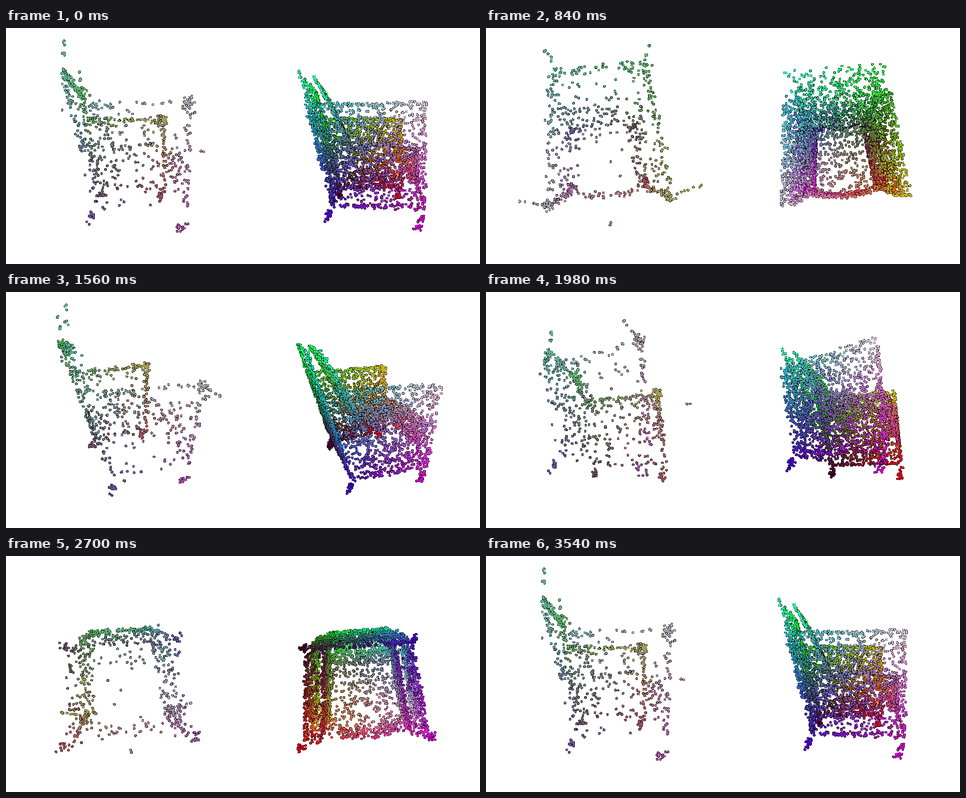
A matplotlib script for the animation above (3600 ms loop, 1024 px wide and 512 px high).

```python
import numpy as np
import matplotlib.pyplot as plt
from matplotlib.animation import FuncAnimation

W, H, DPI = 1024, 512, 100
FRAMES, INTERVAL = 60, 60
FOCAL = H / 2 / np.tan(np.pi / 6)  # 60 degree field of view, camera distance 1
SLAB = 0.055                       # depth step that earns a dark outline
DOT, HALO = 3.7, 4.9               # diameters in pixels

rng = np.random.default_rng(12)


def rear_x(y):
    """The rear of the chair leans back with height."""
    return -.178 - .25 * y


def arm_point(front, high, inset, side):
    """Place in an armrest; front and high run from 0 to 1."""
    y = -.24 + .4 * high
    x = rear_x(y) + front * (.235 - rear_x(y))
    z = side * (.2 + .04 * front + .024 * high - inset)
    return np.stack(np.broadcast_arrays(x, y, z), axis=-1)


def arm(side, n):
    """Random points on the six faces of the armrest."""
    cube = rng.random((n, 3))
    axis = rng.choice(3, n, p=[.12, .12, .76])
    cube[np.arange(n), axis] = rng.integers(0, 2, n)
    front, high, depth = cube.T
    return arm_point(front, high, .065 * depth, side)


def sheet(profile, n, width=.18):
    """Random points on a profile curve swept across the chair."""
    t, z = rng.random(n), rng.uniform(-1, 1, n)
    x, y = profile(t)
    # The seat and its front edge bulge forward in the middle.
    x = x + .03 * np.clip(x / .22, 0, 1) * (1 - z ** 2)
    return np.column_stack([x, y + 0 * t, z * (width + 0 * t)])


def rear(t):
    y = .307 - .547 * t
    return rear_x(y), y


def cushion(t):
    return -.05 - .155 * t ** 1.15, -.02 + .32 * t


def seat(t):
    return -.05 + .273 * t, -.018 + .026 * np.sin(np.pi * t)


def front_edge(t):
    return .223 + 0 * t, -.014 - .164 * t


def line(a, b, n, spread):
    a, b = np.array(a), np.array(b)
    return a + rng.random((n, 1)) * (b - a) + rng.normal(0, spread, (n, 3))


def leg(front, side, n, gather):
    """Leg whose points gather towards the foot."""
    top = arm_point(front, 0, .008, side)
    foot = top - (.02, .05 + .025 * front, 0)
    t = rng.random((n, 1)) ** gather
    return top + t * (foot - top) + rng.normal(0, .006, (n, 3))


def chair(arms, rear_n, cushion_n, seat_n, edge_n, leg_n, gather, noise):
    parts = [arm(side, arms // 2) for side in (-1, 1)]
    parts += [sheet(rear, rear_n), sheet(cushion, cushion_n, .175),
              sheet(seat, seat_n), sheet(front_edge, edge_n)]
    parts += [leg(front, side, leg_n, gather)
              for front in (0, 1) for side in (-1, 1)]
    points = np.vstack(parts)
    return points + rng.normal(0, noise, points.shape)


def stray_points():
    """Points crowding the chair's edges, and outliers beyond its corners."""
    parts = [line((-.25, .305, -.17), (-.25, .305, .17), 46, .009),
             line((.34, -.027, 0), (.39, -.027, 0), 2, .002)]
    for side in (-1, 1):
        back, tip, low = (arm_point(f, h, .02, side)
                          for f, h in [(0, 1), (1, 1), (1, 0)])
        crown = np.array([-.25, .33, side * .15])
        parts += [line(back, tip, 26, .006), line(tip, low, 26, .006),
                  line(tip, tip, 18, .013),
                  line(crown, back, 20, .012),
                  line(tip, (.205, .153, side * .38), 9, .002),
                  line(crown, crown + (0, .12, 0), 6, .003)]
    return np.vstack(parts)


def position_colors(p):
    return np.clip((p + (.3, .28, .3)) / (.66, .6, .68), 0, 1)


sparse = np.vstack([chair(240, 85, 20, 10, 32, 13, .35, .006), stray_points()])
dense = chair(2150, 480, 430, 320, 190, 24, .5, .002)
points = np.vstack([sparse, dense])
center_x = np.repeat([W / 4, 3 * W / 4], [len(sparse), len(dense)])
colors = np.vstack([.31 + .42 * position_colors(sparse), position_colors(dense)])

count = len(points)
all_colors = np.vstack([np.zeros((count, 3)), colors])
all_sizes = np.repeat([(HALO * 72 / DPI) ** 2, (DOT * 72 / DPI) ** 2], count)


def project(theta):
    """Screen positions and depths; azimuth and elevation both equal theta."""
    s, c = np.sin(theta), np.cos(theta)
    eye = np.array([s * c, s, c * c])
    right = np.sign(c) * np.array([c, 0, -s])
    up = np.cross(eye, right)
    depth = 1 - points @ eye
    x = center_x + FOCAL * (points @ right) / depth
    y = H / 2 - FOCAL * (points @ up) / depth
    return np.column_stack([x, y]), depth


fig = plt.figure(figsize=(W / DPI, H / DPI), dpi=DPI, facecolor="white")
ax = fig.add_axes([0, 0, 1, 1])
ax.set(xlim=(0, W), ylim=(H, 0))
ax.axis("off")
dots = ax.scatter(np.zeros(2 * count), np.zeros(2 * count), s=all_sizes,
                  c=all_colors, linewidths=0, antialiased=False)


def update(frame):
    xy, depth = project(2 * np.pi * frame / (FRAMES - 1))
    # Far to near; in each slab all halos lie below all colored dots.
    slab = -np.floor(depth / SLAB)
    layer = np.concatenate([2 * slab, 2 * slab + 1])
    order = np.lexsort((-np.tile(depth, 2), layer))
    dots.set_offsets(np.tile(xy, (2, 1))[order])
    dots.set_sizes(all_sizes[order])
    dots.set_facecolors(all_colors[order])
    return dots,


anim = FuncAnimation(fig, update, frames=FRAMES, interval=INTERVAL,
                     repeat=True, repeat_delay=0, blit=False)
plt.show()
```
